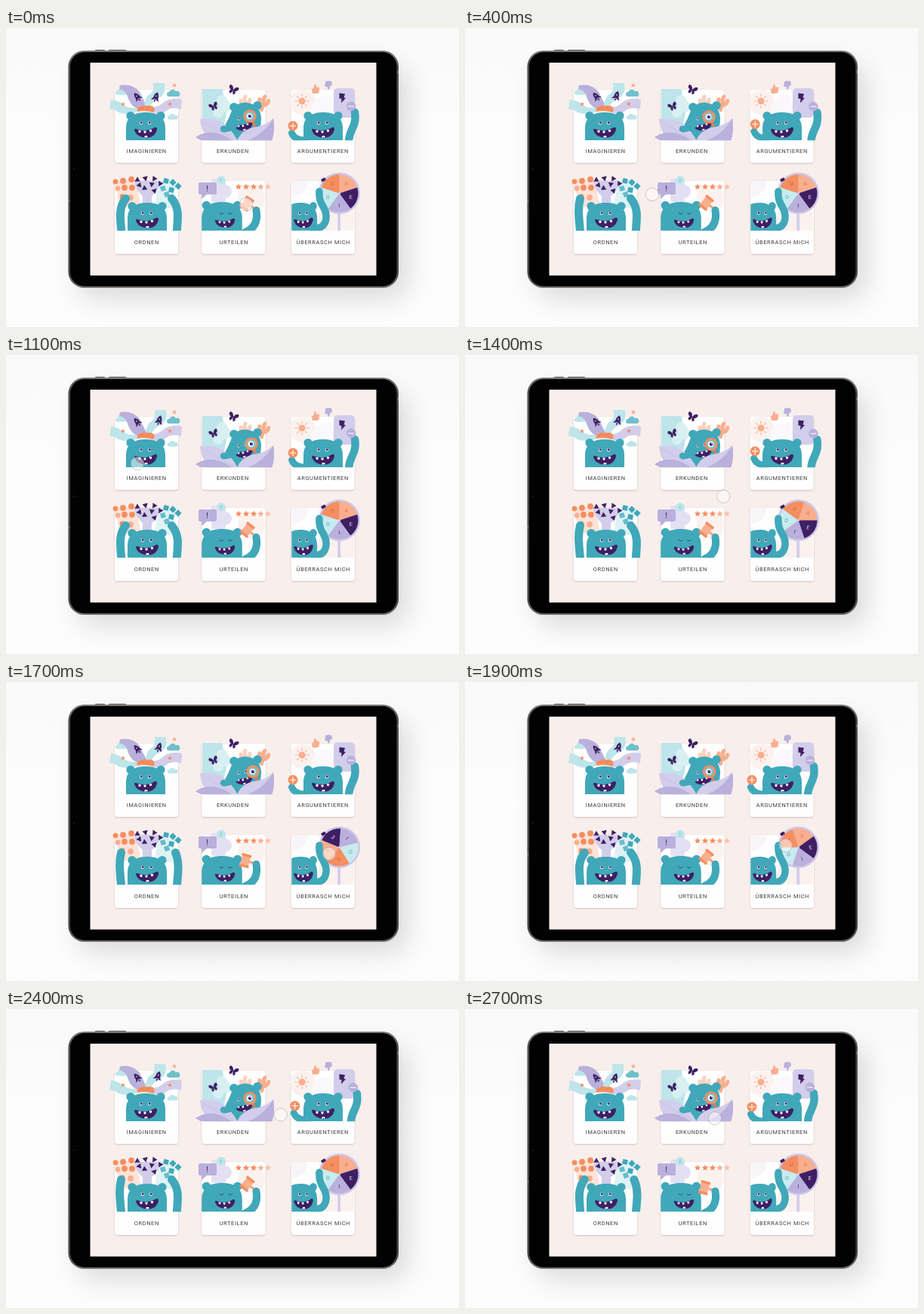
Write an HTML page that moves like this. It is 600 px wide and 397 px high and loops after 2800 ms.

```html
<!DOCTYPE html>
<html lang="de">
<head>
<meta charset="utf-8">
<title>Monster</title>
<style>
html, body { margin: 0; width: 100%; height: 100%; overflow: hidden; background: #fbfbfb; }
svg { display: block; width: 100vw; height: 100vh; }
text { font-family: Roboto, Arial, sans-serif; text-anchor: middle; }
.label { font-size: 7.4px; letter-spacing: .65px; fill: #3d3842; }
</style>
</head>
<body>
<svg id="stage" viewBox="0 0 600 397" xmlns="http://www.w3.org/2000/svg"></svg>
<script>
const TEAL = '#40a8b9', INK = '#3f1f63', LILAC = '#b9b0dc', PALE = '#d2cdea',
      ORANGE = '#f58e60', PEACH = '#f9ae8e', SKY = '#bde5ea', BLUSH = '#fbf2ef';
const LOOP = 2800, STEP = 100, BEAT = LOOP / 3;

const rect = (x, y, w, h, fill, r = 0, more = '') =>
  `<rect x="${x}" y="${y}" width="${w}" height="${h}" rx="${r}" fill="${fill}" ${more}/>`;
const dot = (x, y, r, fill, more = '') => `<circle cx="${x}" cy="${y}" r="${r}" fill="${fill}" ${more}/>`;
const path = (d, fill, more = '') => `<path d="${d}" fill="${fill}" ${more}/>`;
const line = (d, color, w, more = '') =>
  `<path d="${d}" fill="none" stroke="${color}" stroke-width="${w}" stroke-linecap="round" stroke-linejoin="round" ${more}/>`;
const group = (inner, more = '') => `<g ${more}>${inner}</g>`;
const at = (x, y, inner, turn = 0, size = 1) =>
  group(inner, `transform="translate(${x} ${y}) rotate(${turn}) scale(${size})"`);
const word = (x, y, s, size, fill) => `<text x="${x}" y="${y}" font-size="${size}" fill="${fill}">${s}</text>`;
const clip = (id, x, y, w, h) => `<clipPath id="${id}">${rect(x, y, w, h, '#000')}</clipPath>`;

function star(x, y, r, fill) {
  let d = '';
  for (let i = 0; i < 10; i++) {
    const a = i * Math.PI / 5, q = i % 2 ? r * .46 : r;
    d += (i ? 'L' : 'M') + (x + q * Math.sin(a)).toFixed(2) + ' ' + (y - q * Math.cos(a)).toFixed(2);
  }
  return path(d + 'Z', fill);
}

function cloud(x, y, s, fill) {
  return at(x, y, path('M-6 3a3 3 0 0 1 0-6a5 5 0 0 1 9-1a3.5 3.5 0 0 1 3 7Z', fill), 0, s);
}

const mouth = path('M-13-15Q1-10 12-17Q15-18.5 15-14Q12-3.5 1-3Q-11-4-14.5-12Q-15.5-16-13-15Z', INK) +
  [[-8, -13.2], [-1, -12.5], [6.5, -14]].map(([x, y]) =>
    path(`M${x - 1.7} ${y}h3.4l-.4 2.6q-1.3 1.2-2.6 0Z`, '#fff')).join('') +
  path('M-2-3.6l1-2.4h3l.8 2.2Z', '#fff');
const openEyes = [-6, 5].map(x =>
  dot(x, -23, 2.2, '#e3f2f5') + dot(x + .2, -23.2, 1.45, INK)).join('');
const shutEyes = [-5, 8].map(x => line(`M${x - 3}-25.5q3 3.5 6-.4`, INK, .8)).join('');
const torso = [-20, 20].map(x => dot(x, -32.5, 5.6, TEAL)).join('') +
  path('M-26 0V-16C-26-32-14-37 0-37S26-32 26-16V0Z', TEAL);
const monster = (eyes = openEyes) => torso + eyes + mouth;

const rocket = path('M0-8Q5-3 3 3H-3Q-5-3 0-8Z', INK) +
  path('M-3 0L-6 5L-2 4ZM3 0L6 5L2 4ZM-1.5 4h3L0 8Z', INK) + dot(0, -2, 1, PALE);
const butterfly = path('M0 0Q-2-6-6-5Q-8-1-3 1Q-6 4-2 6Q0 4 0 0Q2-6 6-5Q8-1 3 1Q6 4 2 6Q0 4 0 0Z', INK);
const thumb = path('M-5-1h3l3-6q3 0 2 5h3q2 1 1 3l-2 6q-3 1-6 0l-4-1Z', 'currentColor');

function card(x, y, name, mid = x + 42.3) {
  return rect(x, y, 84, 97, '#fefefe', 4, 'filter="url(#soft)"') +
    `<text class="label" x="${mid}" y="${y + 84.3}">${name}</text>`;
}

function imagine() {
  return cloud(153, 86, .9, SKY) + cloud(222, 88, 1, '#6fc0cc') + cloud(221, 119, .8, SKY) +
    path('M139 95Q149 96 156 102Q165 109 178 104L176 110Q163 117 149 112Q142 107 137 108Z', SKY) +
    path('M191 105Q201 106 207 100Q217 91 233 95L232 108Q219 104 211 111Q203 117 192 111Z', PALE) +
    path('M151 76Q168 73 177 85Q182 95 187 105L179 108Q166 106 162 94Q159 82 150 81Z', LILAC) +
    group(path('M184 106Q184 92 194 86Q198 82 196 73H211Q214 87 204 93Q193 98 191 107Z', SKY), 'id="beam"') +
    group(at(0, 0, rocket, -38, .85), 'id="rocketA"') + group(at(0, 0, rocket, 18, .9), 'id="rocketB"') +
    star(155, 101, 3, ORANGE) + star(217, 101, 3.2, ORANGE) + star(223, 76, 3.4, PEACH) +
    at(185, 149, monster()) +
    path('M174 111Q172 105 178 104.5Q182 101 187 103.5Q194 102 196 106Q198 109 195 112Q185 109 174 111Z', ORANGE) +
    line('M178 107q2-3 4 0M186 108q1-4 4-2', '#df754c', .7);
}

function explore() {
  const coral = 'M0 10V-2M0 6Q-6 4-6-3M0 4Q6 2 6-4M0 0Q-2-5 0-8';
  return path('M260 81h27q0 8 3 12q6 2 4 10l-5 24H260Z', SKY) +
    dot(286, 96, 7, '#d9f0f2') + dot(290, 104, 8, '#d9f0f2') + dot(281, 112, 7, '#d9f0f2') +
    at(317, 99, line(coral, '#fbd1c0', 5)) + at(341, 99, line(coral, PEACH, 5), 14) +
    at(301, 82, butterfly, 22, 1) + at(275, 104, butterfly, -22, .9) +
    path('M284 137Q292 128 297 115Q302 99 317 99Q336 100 338 119Q339 135 326 149H300Z', TEAL) +
    dot(302, 105, 5.8, TEAL) + dot(333, 103, 5.8, TEAL) +
    at(316, 139, openEyes + mouth, -8, .84) +
    group(line('M4 8L8.5 17', '#e07e54', 3) + dot(0, 0, 7.4, '#7cc3cf', `stroke="${ORANGE}" stroke-width="2.8"`) +
      dot(-.5, 0, 3.8, '#fff') + dot(0, 0, 2.2, INK) + dot(.8, -1, .7, '#fff'), 'id="lens"') +
    path('M354 120Q357 136 352 150H306Q311 136 327 132Q344 130 354 120Z', PALE) +
    path('M354 120Q357 136 352 150H318Q341 142 354 120Z', LILAC) +
    path('M257 121Q282 118 294 132Q302 140 307 150H272Q259 142 257 121Z', PALE) +
    path('M251 145Q266 135 284 141Q294 145 300 150H264Q256 149 251 145Z', LILAC) +
    line('M259 124Q278 134 302 148M256 145q20-2 36 4', '#c2b9e0', .6) +
    line('M304 128Q295 135 288 134', TEAL, 8.5);
}

function argue() {
  const rays = Array.from({ length: 8 }, (_, i) =>
    group(line('M0-6.5V-9', PEACH, 1.2), `transform="rotate(${i * 45})"`)).join('');
  return dot(393, 99, 17, BLUSH) + at(392, 97, dot(0, 0, 4.6, PEACH) + rays) +
    path('M404 107Q411 88 430 90L441 112H404Z', '#faf8fb') +
    rect(434, 80, 28, 39, PALE, 5) + path('M441.5 86.5L449 87.5L447.5 92.5L450 93L444 99.5L444.5 94L441.5 93.5Z', INK) +
    at(409, 81, group(thumb, `color="${PEACH}"`), -12, .86) +
    at(428, 76, group(thumb, `color="${LILAC}"`), 172, .8) +
    group(line('M397 149Q382 149 378.5 139.5', TEAL, 9) + dot(380, 130, 6.5, ORANGE) +
      line('M376 130h8M380 126v8', '#fff', 1.1), 'id="plus"') +
    group(line('M454 156C453 133 465 134 462 112', TEAL, 10.5) + dot(457, 104, 6.2, LILAC) +
      line('M453.5 104h7', '#fff', 1.1), 'id="minus"') +
    at(420, 149, monster());
}

function sort() {
  const balls = [[145, 204], [155, 203], [166, 201], [148, 213], [157, 212], [167, 212], [154, 224], [165, 225]];
  const tris = [[174, 201], [185, 199], [197, 200], [177, 209], [193, 208], [183, 213], [196, 216], [204, 206]];
  const squares = [[212, 203], [221, 205], [208, 213], [219, 215], [228, 210], [213, 221]];
  return path('M145 202H172L179 237H150Z', '#fce3d8') + path('M202 202H226L220 239H197Z', '#dff2f4') +
    path('M169 203H205Q201 218 193 223V240H181V223Q173 217 169 203Z', PALE) +
    balls.map(([x, y], i) => dot(x, y, i % 3 ? 3.9 : 3.4, i % 4 == 3 ? PEACH : ORANGE)).join('') +
    tris.map(([x, y], i) => at(x, y, path('M0-4L4 3H-4Z', INK), i * 47, .9)).join('') +
    squares.map(([x, y], i) => at(x, y, rect(-3.3, -3.3, 6.6, 6.6, i % 3 == 2 ? '#67bcca' : TEAL), i * 29 + 15)).join('') +
    line('', TEAL, 11, 'id="armL"') + line('', TEAL, 11, 'id="armR"') +
    at(187, 269, monster());
}

function judge() {
  return rect(272, 200, 19, 31, '#e4e0f3', 3) + dot(290, 217, 9, '#e4e0f3') + dot(325, 226, 18, BLUSH) +
    path('M257 205H277Q279 205 279 207V219Q279 221 277 221H266L259 227V221H257Q255 221 255 219V207Q255 205 257 205Z', LILAC) +
    word(266.5, 217, '!', 10, INK) + dot(285, 202, 5.8, SKY) + word(285, 204.5, '!', 7, TEAL) +
    [308, 318, 328, 337.5, 347].map((x, i) => star(x, 211, 4.4, i < 3 ? ORANGE : i < 4 ? PEACH : '#fac2aa')).join('') +
    at(286, 269, torso, 0, 1.03) + at(290, 268, shutEyes + mouth, 0, .88) +
    group(rect(-14, -1.5, 16, 3, '#f3a27e', 1) + rect(-20, -8, 11, 16, PEACH, 1) +
      rect(-21, -9, 13, 3.5, ORANGE, 1) + rect(-21, 5.5, 13, 3.5, ORANGE, 1), 'id="gavel"') +
    line('M317 271Q335 264 331.5 242', TEAL, 10);
}

function surprise() {
  const fills = [PEACH, INK, LILAC, '#c8ebef', ORANGE];
  const tints = ['#d9784f', '#e4def2', INK, TEAL, '#c45f39'];
  const sx = (25 * Math.sin(Math.PI * .4)).toFixed(2), sy = (-25 * Math.cos(Math.PI * .4)).toFixed(2);
  const wedges = fills.map((f, i) => group(
    path(`M0 0V-25A25 25 0 0 1 ${sx} ${sy}Z`, f) +
    group(group(word(0, 2.5, 'AEIOU'[i], 7, tints[i]), `transform="rotate(${-36 - i * 72})"`),
      `transform="rotate(36) translate(0 -16)"`),
    `transform="rotate(${i * 72})"`)).join('');
  return path('M379 203H400Q399 220 379 225Z', '#f8f5f9') + path('M414 203H461V269H403Q424 242 414 203Z', BLUSH) +
    rect(439.3, 244, 3.8, 26, PALE) +
    group(at(390, 269, torso, 0, '.85 1') + at(394, 269, openEyes + mouth, 0, '.85 1'), 'clip-path="url(#edge)"') +
    dot(441.5, 219.5, 27.5, '#cec7e8') +
    group(wedges, 'id="wheel"') + dot(441.5, 219.5, 1.6, PALE) +
    at(420.5, 201.5, rect(-3, -2, 6, 4, INK, 1), -30) +
    line('M407 266C426 267 427 249 420 237Q414 228 415 217', TEAL, 9.5);
}

const stage = document.getElementById('stage');
stage.innerHTML = `<defs>
  <filter id="soft" x="-20%" y="-20%" width="140%" height="140%"><feDropShadow dx="0" dy="1" stdDeviation="1" flood-color="#6b4b4b" flood-opacity=".28"/></filter>
  <filter id="blur" x="-30%" y="-30%" width="160%" height="160%"><feGaussianBlur stdDeviation="17"/></filter>
  <linearGradient id="paper" x2="0" y2="1"><stop stop-color="#f9f9f9"/><stop offset=".4" stop-color="#fdfdfd"/><stop offset="1" stop-color="#fcfcfc"/></linearGradient>
  <linearGradient id="metal" x2="0" y2="1"><stop stop-color="#77797c"/><stop offset=".06" stop-color="#4c4f51"/><stop offset=".94" stop-color="#434548"/><stop offset="1" stop-color="#6a6c6e"/></linearGradient>
  ${clip('top', 112, 46, 379, 103.3)}${clip('bottom', 112, 46, 379, 223.3)}${clip('edge', 378.3, 200, 100, 70)}
  </defs>` +
  rect(0, 0, 600, 397, 'url(#paper)') +
  rect(95, 50, 438, 310, '#000', 24, 'opacity=".13" filter="url(#blur)"') +
  rect(118, 28.8, 13, 2, '#6c6e70', 1) + rect(136, 28.8, 23, 2, '#6c6e70', 1) +
  rect(82.5, 30, 437.5, 315, 'url(#metal)', 21) + rect(85, 32, 432.5, 311, '#020202', 19) +
  dot(90, 187.5, 1.2, '#171b22') + line('M83.3 228V230M519.2 57V60', '#a2a4a6', .8) +
  rect(111.5, 46, 379, 282.6, '#f8efec') +
  card(144, 82, 'IMAGINIEREN') + card(259.5, 82, 'ERKUNDEN', 300.4) + card(377.5, 82, 'ARGUMENTIEREN') +
  card(144, 203, 'ORDNEN') + card(259.5, 203, 'URTEILEN') + card(378, 203, 'ÜBERRASCH MICH') +
  group(imagine() + explore() + argue(), 'clip-path="url(#top)"') +
  group(sort() + judge() + surprise(), 'clip-path="url(#bottom)"') +
  dot(0, 0, 8.6, '#fff', 'id="touch" fill-opacity=".5" stroke="#a9a2a6" stroke-opacity=".7" stroke-width=".8"');

const el = id => document.getElementById(id);
const parts = Object.fromEntries(['beam', 'rocketA', 'rocketB', 'lens', 'plus', 'minus', 'armL', 'armR',
  'gavel', 'wheel', 'touch'].map(id => [id, el(id)]));
const move = (id, x, y, turn = 0) => parts[id].setAttribute('transform', `translate(${x} ${y}) rotate(${turn})`);

const ease = u => { u = Math.max(0, Math.min(1, u)); return .5 - .5 * Math.cos(Math.PI * u); };
const pulse = (p, a, b, c, d) => ease((p - a) / (b - a)) - ease((p - c) / (d - c));

// Keys are [time, x, y]
function track(t, keys) {
  let i = 0;
  while (i < keys.length - 2 && t >= keys[i + 1][0]) i++;
  const [t0, x0, y0] = keys[i], [t1, x1, y1] = keys[i + 1], u = ease((t - t0) / (t1 - t0));
  return [x0 + (x1 - x0) * u, y0 + (y1 - y0) * u];
}

const touchPath = [[0, 318, 234], [150, 316, 233], [400, 248, 221], [700, 160, 230], [850, 160, 230], [1100, 174, 144],
  [1250, 176, 142], [1500, 430, 212], [1700, 428, 228], [1850, 430, 225], [2100, 375, 140],
  [2300, 381, 138], [2550, 331, 145], [2700, 331, 145], [2800, 318, 234]];
const lensPath = [[0, 323, 117], [400, 323, 118], [800, 322, 118], [1100, 325, 118], [1700, 327, 119],
  [2100, 320, 119], [2700, 326, 118], [2800, 323, 117]];
const rocketPath = [[0, 198.5, 92], [400, 200.5, 90.5], [800, 203, 87], [1700, 202.5, 87], [2100, 204, 87],
  [2700, 198.5, 92], [2800, 198.5, 92]];

function draw(ms) {
  const t = Math.floor(ms % LOOP / STEP) * STEP;
  const p = t % BEAT / BEAT;

  const [rx, ry] = track(t, rocketPath);
  move('rocketB', rx, ry);
  move('beam', (rx - 201) * .5, 0);
  move('rocketA', 174, 90.3 + 1.4 * Math.cos(2 * Math.PI * t / LOOP));
  move('lens', ...track(t, lensPath));

  const lift = pulse(p, .17, .26, .48, .7);
  move('plus', 4.3 * lift, -2.3 * lift);
  move('minus', 4.5 * lift, .3 * lift);

  const left = pulse(p, .28, .42, .82, .9), right = pulse(p, .65, .8, .87, .97);
  parts.armL.setAttribute('d', `M153 274C${152 - left} 254 ${148 + left} 240 ${158.5 - 6 * left} 226.5`);
  parts.armR.setAttribute('d', `M226 274C${227 + right} 254 ${231 - right} 240 ${219.5 + 5 * right} 226.5`);

  const swing = pulse(p, .55, .8, .9, 1.04) + 1 - ease((p + .1) / .14);
  move('gavel', 331, 241, 38 - 23 * Math.min(1, swing));
  move('wheel', 441.5, 219.5, 360 * ease((t - 1300) / 700));
  move('touch', ...track(t, touchPath));
}

const start = performance.now();
function tick() {
  draw(performance.now() - start);
  requestAnimationFrame(tick);
}
tick();
</script>
</body>
</html>
```
